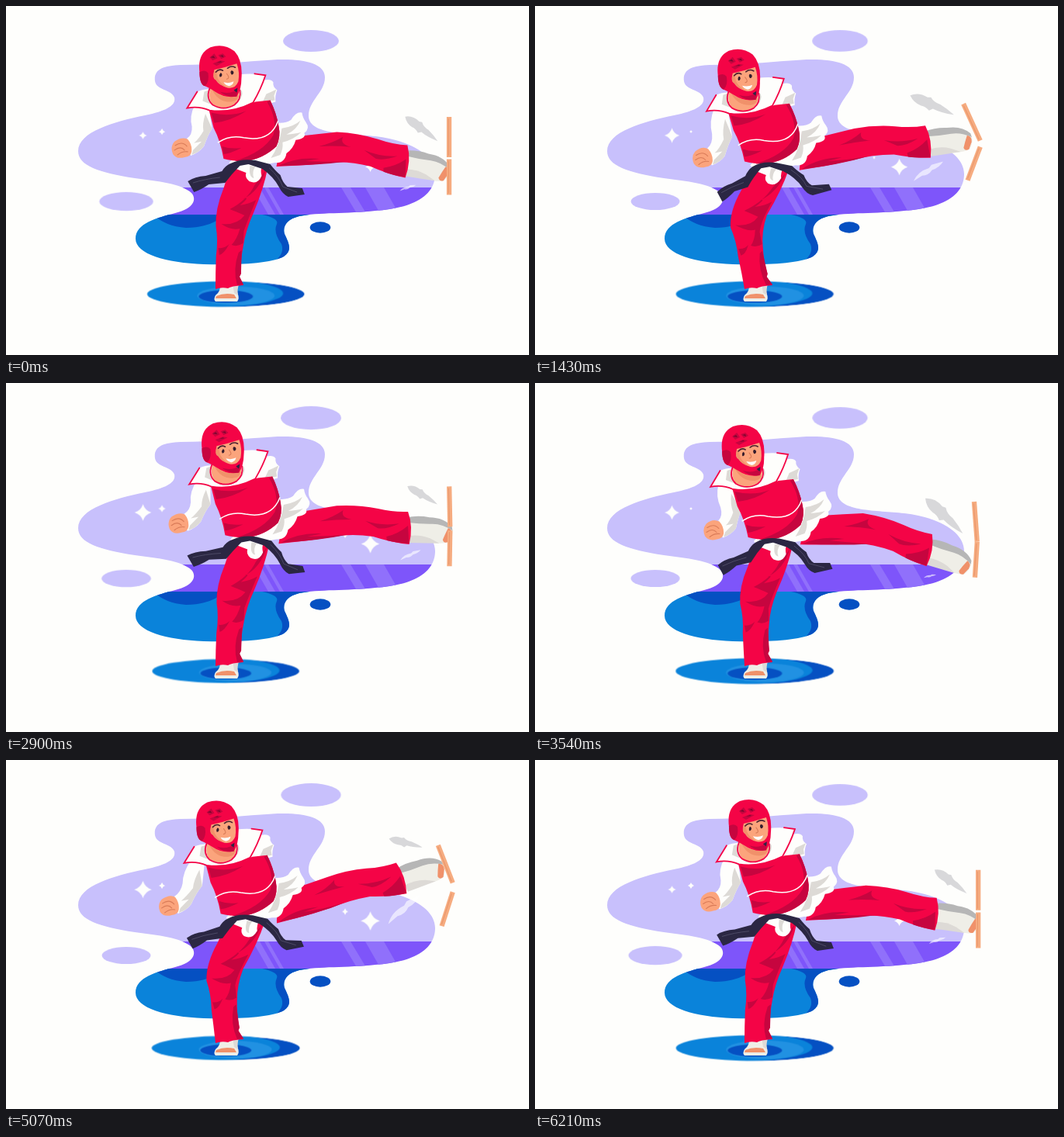
An HTML page for the animation above (6.24 s loop, 674 by 450 pixels).

```html
<!DOCTYPE html>
<html lang="en">
<head>
<meta charset="utf-8">
<title>Board kick</title>
<style>
  html, body { margin: 0; width: 100%; height: 100%; overflow: hidden; background: #fefefc; }
  svg { display: block; width: 674px; height: 450px; }
  .pulse { animation: pulse 1040ms cubic-bezier(.37, 0, .63, 1) infinite alternate; }
  .cloud { --from: .972; --to: 1.085; animation-delay: -340ms; }
  .mist { --from: .9; --to: 1.015; animation-delay: -910ms; }
  .pool { --from: 1.02; --to: .933; animation-delay: -340ms; }
  .big { --from: .5; --to: 1.15; animation-delay: -2070ms; }
  .bright { --from: .65; --to: 1.25; animation-delay: -2070ms; }
  .small { --from: .2; --to: .55; animation-delay: -590ms; }
  @keyframes pulse {
    from { transform: scale(var(--from)); }
    to { transform: scale(var(--to)); }
  }
</style>
</head>
<body>
<svg viewBox="0 0 674 450">
  <defs>
    <clipPath id="blob">
      <path d="M192 97C190 82 202 77 225 76C270 76 315 71 350 69C385 68 411 74 411 92
        C411 112 389 122 390 143C392 166 440 164 476 168C525 174 554 194 553 218
        C552 246 522 261 476 264C440 268 402 266 378 271C362 275 356 284 359 294
        C364 305 370 315 358 323C340 333 290 334 255 333C206 331 167 320 167 300
        C167 280 195 273 218 267C240 262 247 250 239 241C226 229 196 226 166 222
        C120 215 93 206 93 187C93 162 140 149 179 141C208 135 219 128 217 118
        C213 107 194 109 192 97Z"/>
    </clipPath>
    <clipPath id="rim"><ellipse rx="101.5" ry="16.5"/></clipPath>
    <path id="star" fill="#fefefc" d="M0-10Q2.4-2.4 10 0Q2.4 2.4 0 10Q-2.4 2.4-10 0Q-2.4-2.4 0-10Z"/>
  </defs>

  <g clip-path="url(#blob)">
    <path fill="#c8c0fc" d="M80 60H570V234H80Z"/>
    <path fill="#7e55fa" d="M80 234H570V269H80Z"/>
    <path fill="#9070fb" d="M432 234H444L465 269H453ZM463 234H487L507 269H483ZM318 234H327L347 269H338ZM333 234H338L358 269H353Z"/>
    <path fill="#0a83da" d="M80 269H570V340H80Z"/>
    <path fill="#0550c2" d="M190 269H282Q264 286 232 286Q205 284 190 269ZM330 269H400V340H325Q362 326 355 307Q344 292 349 281Q352 274 330 269Z"/>
  </g>
  <g transform="translate(393 45)"><ellipse class="pulse cloud" rx="36" ry="14" fill="#c8c0fc"/></g>
  <g transform="translate(155 252)"><ellipse class="pulse mist" rx="34.3" ry="12" fill="#c8c0fc"/></g>
  <ellipse cx="405" cy="285.5" rx="13.3" ry="7.2" fill="#0550c2"/>

  <g transform="translate(283.3 371.5)">
    <g class="pulse pool">
      <g clip-path="url(#rim)">
        <ellipse rx="101.5" ry="16.5" fill="#0550c2"/>
        <ellipse cx="-20" cy="-1" rx="94" ry="18" fill="#0a83da"/>
        <ellipse cx="13" cy="2" rx="50" ry="12" fill="#2191e2"/>
        <ellipse cx="0" cy="3" rx="35" ry="8" fill="#0550c2"/>
      </g>
    </g>
  </g>

  <g transform="translate(176.5 167)"><use href="#star" class="pulse big"/></g>
  <g transform="translate(201 162)"><use href="#star" class="pulse small"/></g>
  <g transform="translate(469.5 207.5)"><use href="#star" class="pulse bright"/></g>
  <g transform="translate(437 195.5)"><use href="#star" class="pulse small"/></g>

  <g id="figure"></g>

  <g id="board">
    <g id="upper">
      <path fill="#f6ac80" d="M-3-52H3.3V0H-3Z"/>
      <path stroke="#e8956a" stroke-width="1" d="M-.6-50V-2"/>
    </g>
    <g id="lower">
      <path fill="#f6ac80" d="M-3 0H3.3V46H-3Z"/>
      <path stroke="#e8956a" stroke-width="1" d="M-.6 2V44"/>
    </g>
  </g>
</svg>

<script>
const PERIOD = 3120;
const RED = '#f40446', DARK = '#c6053f', WHITE = '#fefefc', SHADE = '#dddad6';
const SKIN = '#fba47c', TAN = '#f0916a', INK = '#2b2743', CREAM = '#efeee7', GREY = '#b6b6b6';
const HIP = [362, 188], KNEE = [425, 183], ANKLE = [519, 200];

let now = 0, pose = {};
const wave = (peak, mean, amp) => mean + amp * Math.cos(2 * Math.PI * (now - peak) / PERIOD);
const clamp = v => Math.max(0, Math.min(1, v));
const mix = (a, b, k) => a + (b - a) * k;

function turn([x, y], [cx, cy], deg) {
  const a = deg * Math.PI / 180, c = Math.cos(a), s = Math.sin(a);
  return [cx + (x - cx) * c - (y - cy) * s, cy + (x - cx) * s + (y - cy) * c];
}
const zoom = ([x, y], [cx, cy], k) => [cx + (x - cx) * k, cy + (y - cy) * k];

function setPose() {
  const hipX = wave(2680, -5, 7), hipY = wave(2680, 1.5, -2.3);
  const shin = wave(480, -8.5, 14.5);
  pose = {
    hipX, hipY, shin,
    thigh: shin * .53,
    // height, shift x, shift y
    spine: [
      [90, wave(2640, -6.4, 10.3), wave(2640, 1.2, -3.4)],
      [205, hipX, hipY],
      [275, wave(2900, -10.5, 11), hipY / 2],
      [358, 0, 0]
    ],
    armX: wave(720, -3, 14),
    armY: wave(1150, 2, 6),
    tail: 13 * wave(1050, .3, .6),
    gust: wave(850, .95, .3),
    draft: wave(1950, .65, .35)
  };
}

function body([x, y]) {
  const s = pose.spine;
  if (y <= s[0][0]) return [x + s[0][1], y + s[0][2]];
  for (let i = 1; i < s.length; i++) {
    if (y > s[i][0]) continue;
    const k = (y - s[i - 1][0]) / (s[i][0] - s[i - 1][0]);
    return [x + mix(s[i - 1][1], s[i][1], k), y + mix(s[i - 1][2], s[i][2], k)];
  }
  return [x, y];
}

function arm(p) {
  const [x, y] = body(p), w = clamp((p[1] - 125) / 50);
  return [x + w * pose.armX, y + w * pose.armY];
}

function belt([x, y]) {
  const left = Math.max(0, (295 - x) / 55), right = Math.max(0, (x - 335) / 50);
  return [
    x + pose.hipX * (1 - .75 * right) + left * pose.tail,
    y + pose.hipY * (1 - 2.7 * right) + left * pose.tail
  ];
}

function swing(p, bend) {
  const [x, y] = turn(turn(p, KNEE, bend * (pose.shin - pose.thigh)), HIP, pose.thigh);
  return [x + pose.hipX, y + pose.hipY];
}
const kick = p => swing(p, clamp((p[0] - 395) / 60));
const foot = p => swing(turn(p, ANKLE, pose.shin * .3), 1);
const gust = p => swing(zoom(p, [556, 174], pose.gust), 1);
const draft = p => swing(zoom(p, [528, 232], pose.draft), 1);

// rig, colour, path, line width (filled when absent)
const shapes = [
  [gust, '#d8d8da', 'M511 140Q522 138 531 147L535 148Q537 155 544 159Q551 166 557 175Q542 169 534 162L529 163Q526 157 521 155Q513 150 511 140Z'],
  [draft, '#ffffff99', 'M478 249Q488 236 506 235L511 231L530 230Q522 238 510 239Q503 246 493 244Z'],

  [foot, CREAM, 'M516 192Q530 187 545 193Q564 196 572 207Q574 217 565 226Q553 228 541 222Q528 219 515 219Z'],
  [foot, GREY, 'M516 187Q531 186 545 191Q564 194 572 207L572 212Q561 202 548 200Q532 198 517 194Z'],
  [foot, TAN, 'M567 208Q573 211 570 218L564 226Q558 227 558 222Q562 215 567 208Z'],
  [foot, SHADE, 'M516 211Q530 211 542 218L553 226Q540 224 515 220Z'],

  [kick, RED, 'M349 207Q350 198 358 186Q364 171 377 168Q402 165 427 162.5Q455 164 480 172Q500 179 518 180Q523 200 515 222Q492 217 470 207Q442 200 420 202Q385 206 349 207Z'],
  [kick, DARK, 'M352 206Q375 194 405 197L386 200Q412 201 438 201Q400 206 352 206ZM404 181Q421 177 435 169Q430 178 445 182Q426 180 404 181ZM462 186Q482 195 505 194Q488 200 477 197ZM487 209Q503 207 516 198L515 221Q500 219 487 214Z'],

  [body, CREAM, 'M276 358L300 357Q297 366 299 372Q301 377 298 381L270 381Q267 378 270 373Q277 368 276 358Z'],
  [body, TAN, 'M271 374Q282 369 294 372L297 377L270 377Z'],
  [body, SHADE, 'M292 358L301 357Q297 366 299 373L294 370Z'],
  [body, RED, 'M289 210L338 208Q333 235 319 268Q309 290 306 310Q302 330 303 345L301 349L306 360Q290 361 286 364Q278 362 270 365Q270 345 271 322Q274 302 271 284Q270 262 281 235Z'],
  [body, DARK, 'M335 212Q327 239 306 249Q317 244 302 257Q315 255 323 250Q312 276 307 290L306 306Q298 311 291 308Q298 301 302 287Q291 290 278 281Q298 283 308 270Q297 265 289 262Q312 250 321 231ZM274 312Q282 313 288 307Q281 320 275 321ZM300 318L304 315L303 345L301 349L306 359L298 360Q292 340 300 318Z'],

  [body, WHITE, 'M343 150Q360 153 368 147Q375 136 382 138Q383 145 387 150Q393 158 385 164Q388 171 374 173Q371 184 362 190Q360 203 347 202L331 205Q328 212 330 219Q325 231 314 226Q308 221 310 215L297 210L288 202Z'],
  [body, SHADE, 'M356 158Q371 156 380 148Q375 160 362 166Q374 165 381 163Q372 172 357 176Q358 184 354 192L342 196Q353 180 356 158ZM315 206L322 207Q317 214 320 222Q313 221 315 206Z'],

  [arm, WHITE, 'M244 128Q237 143 241 157Q242 168 235 173Q233 183 240 195Q251 191 257 183Q262 168 267 160L262 130Z'],
  [arm, SHADE, 'M258 140Q254 153 256 163Q250 174 244 179L254 177L243 188L241 194Q251 191 257 183Q262 168 267 160Z'],
  [arm, SKIN, 'M236 174Q228 170 219 177Q213 184 217 193Q222 200 232 197Q240 196 241 190Q242 181 236 174Z'],
  [arm, '#d97b58', 'M220 182Q229 176 235 183M219 188Q227 182 232 188M223 194Q229 189 236 190', 1.1],

  [body, WHITE, 'M328 98Q341 93 345 99Q344 105 350 109Q347 116 348 124L334 128L318 124Z'],
  [body, SHADE, 'M336 114Q343 111 349 108L346 116L347 122L331 125Z'],
  [body, RED, 'M262 134Q295 136 322 124L341 122Q349 138 352 155Q355 169 349 181Q332 197 309 200Q291 200 281 197Q277 174 268 157Z'],
  [body, DARK, 'M337 124L341 122Q349 138 352 155Q355 169 349 181Q332 197 309 200L295 200Q332 189 345 167Q351 147 337 124ZM265 138Q289 144 310 136Q290 149 269 151ZM279 181Q290 185 304 183Q290 190 281 191Z'],
  [body, WHITE, 'M274 176Q289 166 307 170Q341 176 351 149', 1.5],

  [body, WHITE, 'M247 111Q257 107 264 108L301 89Q319 87 335 90Q329 108 319 125Q291 139 263 135Q246 129 234 132Z'],
  [body, SHADE, 'M303 108Q307 112 303 120Q298 128 287 132Q277 134 268 131Q286 134 297 126Q304 119 303 108ZM256 111L262 109Q258 118 264 127L254 123Z'],
  [body, RED, 'M247 111L234 132Q249 129 263 135Q291 139 319 125Q329 108 335 90L321 88', 1.8],
  [body, SKIN, 'M264 106L299 103Q305 119 294 128Q281 135 268 128Q260 121 264 106Z'],
  [body, TAN, 'M266 108Q282 123 300 115Q300 123 291 124Q274 125 266 108Z'],
  [body, RED, 'M263 107Q258 120 267 128Q281 136 295 128Q304 121 302 109', 1.8],

  [belt, INK, 'M290 203Q304 196 322 199L341 204Q348 213 354 218Q357 228 363 233L382 235L385 243L364 246Q357 243 352 233Q345 220 331 210L313 204L302 206Q291 217 283 228L262 230Q252 237 243 240L235 226Q244 220 258 219L279 213Q283 206 290 203Z'],
  [belt, '#4d4a66', 'M242 228Q257 223 276 221M340 209Q353 221 357 233L375 240', 1],

  [body, RED, 'M250 86Q247 62 264 54Q281 48 295 59Q306 71 304 94Q304 108 298 117Q283 120 270 111Q262 106 257 104Q250 102 250 86Z'],
  [body, SKIN, 'M269 83Q283 80 298 75Q302 86 300 98Q296 108 286 106Q275 103 271 96Q266 94 269 83Z'],
  [body, TAN, 'M269 85L272 84Q271 97 284 105Q274 102 271 96Q266 94 269 85Z'],
  [body, DARK, 'M250 86Q257 82 261 87Q263 98 257 104Q250 102 250 86ZM263 67L269 62L273 68L267 71ZM274 64L280 62L284 66L278 69ZM267 75L277 71L283 72L272 78ZM276 111Q289 115 299 108L298 117Q286 119 276 111Z'],
  [body, '#7d0830', 'M264 67L268 65L270 68ZM276 65L280 64L281 67ZM272 74L277 72L279 73Z'],
  [body, '#4a2230', 'M271 86Q275 81 280 84M286 81Q291 77 296 80', 1.6],
  [body, '#351c2c', 'M277 87Q279 87 279 90Q278 93 276 92Q275 89 277 87ZM291 84Q294 84 294 87Q293 90 291 89Q289 86 291 84Z'],
  [body, '#d97b58', 'M285 88Q290 94 285 95', 1.1],
  [body, WHITE, 'M281 99Q288 101 294 98Q293 103 288 104Q283 103 281 99Z'],
  [body, INK, 'M294 109L299 106L298 112Z']
];

const figure = document.getElementById('figure');
const parts = shapes.map(([rig, color, path, width]) => {
  const el = document.createElementNS('http://www.w3.org/2000/svg', 'path');
  el.setAttribute('fill', width ? 'none' : color);
  if (width) {
    el.setAttribute('stroke', color);
    el.setAttribute('stroke-width', width);
    el.setAttribute('stroke-linecap', 'round');
  }
  figure.append(el);
  return { el, rig, path };
});

const place = (id, value) => document.getElementById(id).setAttribute('transform', value);

function drawBoard() {
  const gap = wave(2030, 6, 6) / 2;
  place('board', `translate(${wave(480, 572.6, -3)} ${wave(480, 184.5, 20.5)})`);
  place('upper', `translate(0 ${-gap}) rotate(${wave(1560, -12.5, -12.5)})`);
  place('lower', `translate(0 ${gap}) rotate(${wave(1560, 10.5, 10.5)})`);
}

function draw() {
  now = performance.now() % PERIOD;
  setPose();
  for (const { el, rig, path } of parts) {
    el.setAttribute('d', path.replace(/([\d.]+) ([\d.]+)/g, (_, x, y) =>
      rig([+x, +y]).map(v => v.toFixed(2)).join(' ')));
  }
  drawBoard();
  requestAnimationFrame(draw);
}
draw();
</script>
</body>
</html>
```
